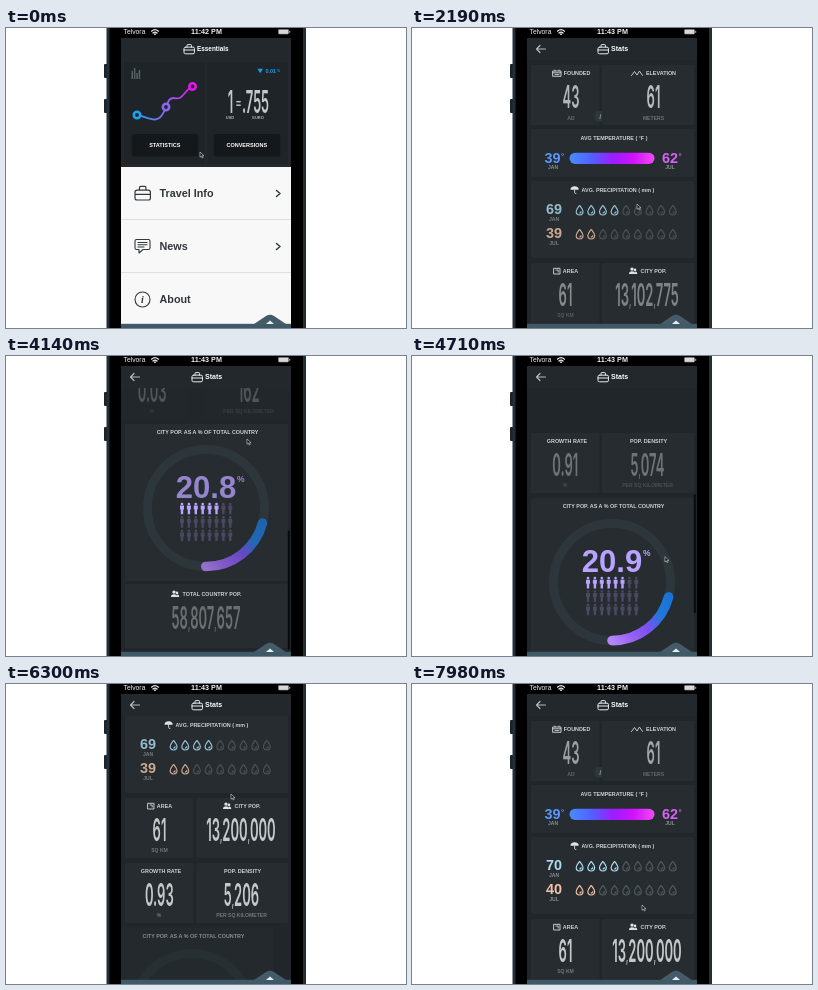
An HTML page that plays this animation: 400x300 px, repeating every 8000 ms.

```html
<!DOCTYPE html>
<html lang="en">
<head>
<meta charset="utf-8">
<title>City stats</title>
<style>
html, body { margin: 0; width: 100%; height: 100%; overflow: hidden; background: #fff; }
svg { display: block; width: 100vw; height: 100vh; }
text { font-family: "Liberation Sans", Arial, sans-serif; font-weight: bold; }
.mid { text-anchor: middle; }
.label { font-size: 5.4px; fill: #cdd1d3; }
.unit { font-size: 5.1px; fill: #878d90; }
.tall { font-family: Inter, sans-serif; font-weight: 600; font-size: 31px; fill: #f4f6f6; text-anchor: middle; }
.comma { font-size: 17px; }
.line { fill: none; stroke: #d4d8da; stroke-width: .9; stroke-linecap: round; stroke-linejoin: round; }
</style>
</head>
<body>
<svg id="stage" viewBox="0 0 400 300"></svg>
<script>
const LOOP = 8000;
const stage = document.getElementById('stage');
const clamp = v => Math.max(0, Math.min(1, v));
const range = n => [...Array(n).keys()];

// Markup helpers
const box = (x, y, w, h, fill, r = 0) =>
  `<rect x="${x}" y="${y}" width="${w}" height="${h}" rx="${r}" fill="${fill}"/>`;
const text = (x, y, str, cls, extra = '') => `<text x="${x}" y="${y}" class="${cls}" ${extra}>${str}</text>`;
const label = (x, y, str) => text(x, y, str, 'mid label');
const unit = (x, y, str) => text(x, y, str, 'mid unit');
const line = (d, extra = '') => `<path class="line" d="${d}" ${extra}/>`;
const tall = (x, y, id, str = '') =>
  `<g transform="translate(${x} ${y}) scale(.42 1)"><text id="${id}" class="tall">${str}</text></g>`;
const briefcase = (x, y, k, color) =>
  `<g transform="translate(${x} ${y}) scale(${k})">` +
  line('M1.5 3H9.5Q11 3 11 4.5V8.5Q11 10 9.5 10H1.5Q0 10 0 8.5V4.5Q0 3 1.5 3M3.2 3V1Q3.2 .3 4 .3H7Q7.8 .3 7.8 1V3M0 6H11',
    `style="stroke:${color};stroke-width:${k > 1.2 ? .85 : 1}"`) + '</g>';
const people = (x, y) =>
  `<g fill="#dfe3e4"><circle cx="${x + 3}" cy="${y + 1.6}" r="1.7"/><path d="M${x} ${y + 6.5}q0-2.8 3-2.8t3 2.8z"/>` +
  `<circle cx="${x + 6}" cy="${y + 2.4}" r="1.3"/><path d="M${x + 5} ${y + 6.5}l1-2.4q2.3 0 2.3 2.4z"/></g>`;

// One dashboard panel; its .val group fades in separately
const card = (id, x, y, w, h, head, body) =>
  `<g id="${id}">${box(x, y, w, h, '#262c30', 1.5)}${head}<g class="val">${body}</g></g>`;

const drop = (x, y, id) =>
  `<path id="${id}" transform="translate(${x} ${y})" fill="none" stroke-width="1.2" ` +
  'd="M0-4.8C1-3 3.4-.6 3.4 1.6A3.4 3.4 0 0 1-3.4 1.6C-3.4-.6-1-3 0-4.8M1.5 1.2A1.5 1.5 0 0 1-.3 2.8"/>';
const drops = (row, y) => range(9).map(i => drop(167.6 + 11.65 * i, y, row + i)).join('');

const person = i =>
  `<g id="man${i}" transform="translate(${176 + 6.9 * (i % 8)} ${444 + 13.4 * Math.floor(i / 8)})">` +
  '<circle cy="1" r="1.3"/><path d="M-2 2.6H2V6.6H1.2V11.3H-1.2V6.6H-2z"/></g>';

// Points on the share ring, clockwise degrees from the right
const ringPoint = deg => {
  const a = deg * Math.PI / 180;
  return `${200 + 58.5 * Math.cos(a)} ${449 + 58.5 * Math.sin(a)}`;
};
const SHARE = 20.9;

const cards = [
  card('founded', 119, 37, 68.5, 60,
    label(165, 47, 'FOUNDED') + line('M141 43H149V48.3H141zM141 44.8H149M143 42V43M147 42V43M143 46.6H147') +
    box(183, 83, 10.5, 10.5, '#30373b', 3) + text(188.3, 91, 'i', 'mid', 'font-size="7" fill="#899095" font-style="italic"'),
    tall(159, 80, 'foundedN') + unit(159, 91.5, 'AD')),
  card('elevation', 190, 37, 92, 60,
    label(249, 47, 'ELEVATION') + line('M219.5 47.5L222.5 43.5L225 47L227.5 43L230.5 47.5'),
    tall(241.5, 80, 'elevationN') + unit(241.5, 91.5, 'METERS')),
  card('temp', 119, 101, 163, 48,
    label(202, 112, 'AVG TEMPERATURE ( °F )'),
    text(140.5, 135, '', 'mid', 'id="tJan" font-size="14.4" fill="#5a96ff"') + text(149, 131, '°', '', 'font-size="8" fill="#5a96ff"') +
    text(258, 135, '', 'mid', 'id="tJul" font-size="14.4" fill="#d562f6"') + text(266.5, 131, '°', '', 'font-size="8" fill="#d562f6"') +
    unit(141, 141.3, 'JAN') + unit(258, 141.3, 'JUL') + box(157.5, 124.7, 85, 11.2, 'url(#heat)', 5.6)),
  card('rain', 119, 153, 163, 77,
    label(206, 163.5, 'AVG. PRECIPITATION ( mm )') +
    '<path fill="#dfe3e4" d="M158.5 161.8a4.1 3.6 0 0 1 8.2 0z"/>' + line('M162.6 161V164.6q0 1.2 1.4.8'),
    text(142, 186, '', 'mid', 'id="rJan" font-size="14.4" fill="#a9d9ee"') + unit(142, 193.3, 'JAN') +
    text(142, 210, '', 'mid', 'id="rJul" font-size="14.4" fill="#f0c2a6"') + unit(142, 217.3, 'JUL') +
    drops('a', 182) + drops('b', 206)),
  card('area', 119, 235, 68.5, 60,
    label(158.5, 245, 'AREA') + line('M142 240.3H148V246H142zM144 242H146.2V244'),
    tall(153.5, 278, 'areaN') + unit(153.5, 289.3, 'SQ KM')),
  card('pop', 190, 235, 92, 60,
    label(241.5, 245, 'CITY POP.') + people(217, 239.5), tall(235, 278, 'popN')),
  card('growth', 119, 300, 68.5, 60,
    label(155, 310, 'GROWTH RATE'), tall(153.3, 343, 'growthN') + unit(153, 354.3, '%')),
  card('density', 190, 300, 92, 60,
    label(236.5, 310, 'POP. DENSITY'), tall(235.5, 343, 'densityN') + unit(235.5, 354.3, 'PER SQ KILOMETER')),
  card('share', 119, 365, 163, 157,
    label(201.5, 375, 'CITY POP. AS A % OF TOTAL COUNTRY') +
    '<circle cx="200" cy="449" r="58.5" fill="none" stroke="#2d363a" stroke-width="9"/>' + range(24).map(person).join(''),
    `<path id="arc" fill="none" stroke="url(#sweep)" stroke-width="9.6" stroke-linecap="round" d="M${ringPoint(90)}A58.5 58.5 0 0 0 ${ringPoint(90 - 3.6 * SHARE)}"/>` +
    text(200, 439, '', 'mid', 'id="shareN" font-size="31" fill="#b9a3ff"') +
    text(231, 422.5, '%', '', 'font-size="8.5" fill="#b9a3ff"')),
  card('total', 119, 525, 163, 64,
    label(206, 537, 'TOTAL COUNTRY POP.') + people(165, 531.5), tall(200, 569.5, 'totalN')),
].join('');

const header = (title, x, size) => box(115, 10, 170, 22, '#22282c') + briefcase(x, 16.3, .95, '#f2f4f4') +
  text(x + 13, 23.3, title, '', `font-size="${size}" fill="#fff"`);

const menuItem = (y, name) => text(153.5, y + 4, name, '', 'font-size="10.8" fill="#31383c"');
const chevron = y => line(`M270.5 ${y - 3}L274 ${y}L270.5 ${y + 3}`, 'style="stroke:#31383c;stroke-width:1.5"');
const dark = 'style="stroke:#31383c;stroke-width:1.1"';
const button = (x, str) => box(x, 106, 66.5, 22.5, '#14181b', 2.5) +
  text(x + 33, 119.2, str, 'mid', 'font-size="5.5" fill="#fff"');
const knob = (x, y, color) => `<circle cx="${x}" cy="${y}" r="3.2" fill="#22282c" stroke="${color}" stroke-width="2.6"/>`;

const menu =
  box(115, 10, 170, 130, '#22282c') + box(118, 34, 81, 102, '#1e2428') + box(201, 34, 81, 102, '#1e2428') +
  header('Essentials', 178, 6.4) +
  [8, 11, 6, 9].map((h, i) => box(125.5 + 2.4 * i, 51 - h, 1.5, h, '#596166')).join('') +
  '<path d="M131 87C142 89 150 96 156 87C163 78 160 70 168 70C178 73 178 61 187 58.5" fill="none" stroke="url(#trend)" stroke-width="1.8"/>' +
  knob(131, 87, '#1aa4f4') + knob(160, 79, '#8868ee') + knob(186.5, 58.5, '#e614e8') +
  '<path d="M251.5 40.8h5.4l-2.7 4.4z" fill="#1c9fea"/>' + text(259.5, 45.3, '0.01', '', 'font-size="5.4" fill="#1c9fea"') +
  text(271, 43.5, '%', '', 'font-size="3.4" fill="#1c9fea"') +
  tall(224.5, 85, 'one', '1') + box(230.3, 73, 4.4, 1.4, '#c6cacb') + box(230.3, 76.5, 4.4, 1.4, '#c6cacb') + tall(249.5, 85, 'rate', '.755') +
  text(224, 91, 'USD', 'mid', 'font-size="4" fill="#b0b5b8"') + text(252, 91, 'EURO', 'mid', 'font-size="4" fill="#b0b5b8"') +
  button(125.8, 'STATISTICS') + button(207.8, 'CONVERSIONS') +
  box(115, 139, 170, 157, '#f8f8f8') + box(115, 191, 170, 1, '#dedede') + box(115, 244, 170, 1, '#dedede') +
  menuItem(165, 'Travel Info') + menuItem(218, 'News') + menuItem(271, 'About') + chevron(165.5) + chevron(218.5) +
  briefcase(129, 158, 1.4, '#31383c') +
  line('M130.5 211.5H142.5Q144 211.5 144 213V220Q144 221.5 142.5 221.5H137L133 225V221.5H130.5Q129 221.5 129 220V213Q129 211.5 130.5 211.5M132 214.5H141M132 216.7H141M132 219H138', dark) +
  `<circle cx="136.5" cy="271.5" r="7.5" class="line" ${dark}/>` +
  text(136.5, 275, 'i', 'mid', 'font-size="10" fill="#31383c" font-style="italic" style="font-family:\'Liberation Serif\',serif"');

const stops = (...colors) => colors.map((c, i) => `<stop offset="${i / (colors.length - 1)}" stop-color="${c}"/>`).join('');

stage.innerHTML = `<defs>
  <linearGradient id="heat">${stops('#4a8cff', '#4f62ff', '#9a1eff', '#d010ff', '#ee4cf6')}</linearGradient>
  <linearGradient id="trend" gradientUnits="userSpaceOnUse" x1="131" y1="0" x2="187" y2="0">${stops('#1aa4f4', '#8868ee', '#e614e8')}</linearGradient>
  <linearGradient id="sweep" gradientUnits="userSpaceOnUse" x1="200" y1="508" x2="258" y2="464">${stops('#b386fa', '#9a60f6', '#7a50f0', '#1f78dc', '#1a74d6')}</linearGradient>
  <clipPath id="screen"><rect x="115" y="10" width="170" height="286"/></clipPath></defs>` +
  box(0, 0, 400, 300, '#fff') + box(98, 36, 4, 14, '#1b2429', 1) + box(98, 71, 4, 14, '#1b2429', 1) +
  box(100.5, 0, 199.5, 300, '#222f36') + box(103.5, 0, 193.5, 300, '#000') +
  '<g clip-path="url(#screen)">' + box(115, 10, 170, 286, '#20262a') +
  `<g id="menu">${menu}</g><g id="stats">${box(115, 10, 170, 286, '#20262a')}<g id="page">${cards}</g>` +
  header('Stats', 186, 7) + line('M133.5 21H124.5M128 17.5L124.5 21L128 24.5', 'style="stroke:#b4b9bb;stroke-width:1.2"') +
  '<rect id="bar" x="281.8" width="2" height="119" rx="1" fill="#080a0b"/></g></g>' +
  text(117.5, 6.3, 'Telvora', '', 'font-size="6.8" fill="#eee" style="font-weight:normal"') +
  line('M145.5 3.2Q149 .2 152.5 3.2M147 5Q149 3.2 151 5', 'style="stroke:#eee;stroke-width:1.2"') + '<circle cx="149" cy="6.2" r=".9" fill="#eee"/>' +
  text(200.5, 6.4, '', 'mid', 'id="clock" font-size="7.2" fill="#f2f2f2"') +
  '<rect x="272.5" y="1.5" width="10" height="4.6" rx=".8" fill="#d8d8d8" stroke="#888" stroke-width=".6"/>' + box(283.2, 2.8, 1, 2, '#bbb') +
  box(115, 295.8, 170, 4.2, '#405966') + '<path d="M248 296L260 288Q264 285.6 268 288L280 296z" fill="#445c68"/>' +
  '<path d="M260 296l4-3.6 4 3.6z" fill="#e8eef0"/>' +
  '<path id="cursor" d="M0 0V5.2L1.3 4.1L2.2 6L3.2 5.5L2.3 3.7H4z" fill="#111" stroke="#d8d8d8" stroke-width=".6"/>';

const el = {};
stage.querySelectorAll('[id]').forEach(n => el[n.id] = n);
const setText = (id, s) => { if (el[id].textContent !== s) el[id].textContent = s; };

// Large figures use a small comma
function setFigure(id, s) {
  if (el[id].textContent !== s) el[id].innerHTML = s.replace(/,/g, '<tspan class="comma">,</tspan>');
}

// Smooth curve through [time, value] keys without overshoot
function curve(keys, t) {
  const last = keys.length - 1;
  if (t <= keys[0][0]) return keys[0][1];
  if (t >= keys[last][0]) return keys[last][1];
  const slope = i => (keys[i + 1][1] - keys[i][1]) / (keys[i + 1][0] - keys[i][0]);
  const tangent = i => {
    if (i === 0 || i === last) return 0;
    const a = slope(i - 1), b = slope(i);
    return a * b > 0 ? 2 * a * b / (a + b) : 0;
  };
  const i = keys.findIndex(k => k[0] > t) - 1;
  const [t0, v0] = keys[i], [t1, v1] = keys[i + 1];
  const w = t1 - t0, s = (t - t0) / w, r = 1 - s;
  return v0 * (1 + 2 * s) * r * r + v1 * s * s * (3 - 2 * s) + w * s * r * (r * tangent(i) - s * tangent(i + 1));
}

const SCROLL = [[2600, 0], [2950, 60], [3270, 135], [3420, 222], [3783, 286], [4050, 297], [4145, 297],
  [4220, 286], [4720, 222], [5190, 183], [5600, 138], [6100, 122], [6300, 121], [6600, 119], [6950, 70], [7250, 14], [7600, 0]];
const CURSOR_X = [[0, 194], [600, 170], [1300, 190], [2190, 225], [3420, 243], [4140, 241], [5190, 262], [6300, 225], [7980, 230]];
const CURSOR_Y = [[0, 124], [600, 118], [1300, 150], [2190, 176], [2600, 230], [3420, 146], [4140, 83], [5190, 291], [6300, 110], [7400, 222], [7980, 221]];

const num = v => Math.floor(v).toLocaleString('en-US');
const count = (id, max, fmt = num) => c => setFigure(id, fmt(max * c));
const both = (...fns) => c => fns.forEach(f => f(c));
const wet = (row, lit, color) => c => range(9).forEach(i =>
  el[row + i].setAttribute('stroke', i < Math.round(lit * c) ? color : '#535a5e'));

function showShare(c) {
  const pct = SHARE * c;
  setText('shareN', pct.toFixed(1));
  el.arc.setAttribute('transform', `rotate(${82 * (1 - c)} 200 449)`);
  el.arc.setAttribute('opacity', c * c);
  range(24).forEach(i => el['man' + i].setAttribute('fill', i < Math.ceil(pct * .24) ? '#b9a3ff' : '#4b4960'));
}

// Panels: id, slide distance, brightness, alternating in/out times, value painter
const PANELS = [
  ['founded', -10, 1, [900, 2760, 6950], count('foundedN', 43)],
  ['elevation', 10, 1.05, [900, 2760, 6950], count('elevationN', 61)],
  ['temp', -35, 2, [900, 3080, 6880], both(count('tJan', 39), count('tJul', 62))],
  ['rain', -35, 2, [1530, 3280, 5640],
    both(count('rJan', 70), count('rJul', 40), wet('a', 4, '#aee0f6'), wet('b', 2, '#f2c3a5'))],
  ['area', -10, 1, [1390, 3404, 4719.5], count('areaN', 61.3)],
  ['pop', 10, 1, [1482.5, 3404, 4719.5], count('popN', 13200000)],
  ['growth', -10, 1, [2950, 3784, 4180, 7000], count('growthN', .93, v => v.toFixed(2))],
  ['density', 10, 1, [2950, 3784, 4180, 7000], count('densityN', 5206)],
  ['share', -35, 1.5, [3271, 6100], showShare],
  ['total', -35, 1, [3656, 4220], count('totalN', 60920000)],
];

function paintPanel([id, slide, gain, times, paint], t) {
  const i = times.filter(x => x <= t).length - 1;
  const u = t - times[i];
  let alpha = 0, shift = 1, c = 0, glow = 0;
  if (i >= 0 && i % 2 === 0) {
    alpha = clamp(u / 150);
    shift = (1 - alpha) ** 2;
    c = u >= 1000 ? 1 : 1 - 2 ** (-u / 100);
    glow = .12 + .66 * clamp(u / 1500);
  } else if (i > 0) {
    shift = clamp(u / 500);
    alpha = 1 - shift;
    c = 2 ** (-7 * shift);
    glow = .78;
  }
  el[id].setAttribute('opacity', alpha);
  el[id].setAttribute('transform', `translate(${slide * shift} 0)`);
  el[id].querySelector('.val').setAttribute('opacity', Math.min(1, glow * gain));
  paint(c);
}

function render(t) {
  const push = 1 - (1 - clamp((t - 850) / 380)) ** 3;
  el.menu.setAttribute('transform', `translate(${-170 * push} 0)`);
  el.stats.setAttribute('transform', `translate(${170 * (1 - push)} 0)`);
  setText('clock', t < 850 ? '11:42 PM' : '11:43 PM');

  const y = curve(SCROLL, t);
  el.page.setAttribute('transform', `translate(0 ${-y})`);
  el.bar.setAttribute('y', 29 + .49 * y);
  const shown = (a, b) => clamp((t - a) / 120) * clamp((b - t) / 250);
  el.bar.setAttribute('opacity', Math.max(shown(2600, 6200), shown(6550, 7850)));

  PANELS.forEach(p => paintPanel(p, t));
  el.cursor.setAttribute('transform', `translate(${curve(CURSOR_X, t)} ${curve(CURSOR_Y, t)})`);
}

el.one.setAttribute('opacity', .78);
el.rate.setAttribute('opacity', .78);
const start = performance.now();
function tick() {
  render((performance.now() - start) % LOOP);
  requestAnimationFrame(tick);
}
tick();
</script>
</body>
</html>
```
